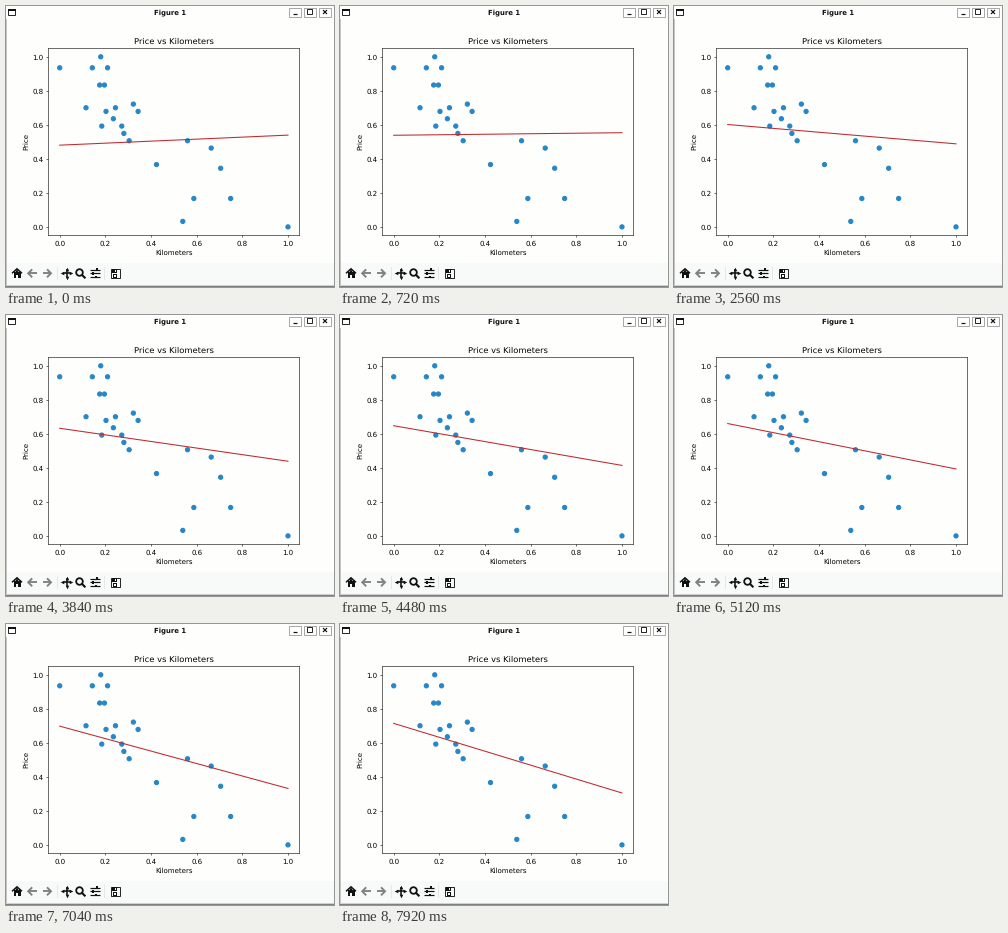
Animation, 328 px wide and 281 px high, one loop 8000 ms. Source, as a matplotlib script:

```python
import matplotlib.pyplot as plt
import numpy as np
from matplotlib.animation import FuncAnimation
from matplotlib.patches import Rectangle

W, H, DPI = 328, 281, 64      # a power of two keeps the pixel size exact
K = 50.6 / DPI                # window is shown at 50.6 dpi
PX = 72 / DPI                 # points per pixel
FRAMES, STEP_MS = 100, 80
HOLDS = {1, 26, 44, 95}       # frames that repeat the one before

INK, GRAY, BLUE, RED = "#111111", "#808080", "#2586c8", "#bf2a30"
PAPER, BAR = "#fefefd", "#f8faf9"

plt.rcParams.update({
    "font.family": "DejaVu Sans", "font.size": 10 * K, "text.hinting": "none",
    "axes.titlesize": 12 * K, "axes.titlepad": 6 * K, "axes.labelpad": 4 * K,
    "axes.linewidth": 0.8 * K,
})
for axis in ("xtick", "ytick"):
    for key, size in (("size", 3.5), ("pad", 3.5), ("width", 0.8)):
        plt.rcParams[f"{axis}.major.{key}"] = size * K

# Thousands of kilometers at each price; the middle prices are evenly spaced
cars = dict(zip(range(5800, 7001, 200),
                ([167], [89, 144.5], [84], [82, 63], [74], [97.5, 67], [93])))
cars |= {3650: [240], 3800: [140], 4425: [150.5, 185.5], 5250: [176],
         5350: [115], 6900: [76, 48], 7520: [61, 65.5],
         7990: [54, 68.5, 23], 8290: [62]}


def normalize(values):
    v = np.array(values)
    return (v - v.min()) / (v.max() - v.min())


def descend(x, y, steps, rate=0.1):
    """Intercept and slope after every gradient descent step."""
    a = b = 0.0
    path = [(a, b)]
    for _ in range(steps):
        err = a + b * x - y
        a, b = a - rate * err.mean(), b - rate * (err * x).mean()
        path.append((a, b))
    return path


x = normalize([km for kms in cars.values() for km in kms])
y = normalize([price for price, kms in cars.items() for _ in kms])
path = descend(x, y, 150)

fig = plt.figure(figsize=(W / DPI, H / DPI), dpi=DPI, facecolor=PAPER)

# Window frame and toolbar, in pixel coordinates
win = fig.add_axes([0, 0, 1, 1])
win.set(xlim=(0, W), ylim=(H, 0))
win.axis("off")


def box(x0, y0, w, h, fill="none", edge="none"):
    win.add_patch(Rectangle((x0, y0), w, h, fc=fill, ec=edge, lw=0.9 * PX))


def stroke(xs, ys, color=INK, lw=1.2):
    win.plot(xs, ys, color=color, lw=lw * PX, solid_capstyle="butt",
             solid_joinstyle="miter")


def mark(cx, cy, marker, size, fill=INK, lw=0.0):
    win.plot(cx, cy, marker=marker, ms=size * PX, mfc=fill, mec=INK,
             mew=lw * PX)


def title_bar():
    win.text(W / 2, 8, "Figure 1", size=6.9 * PX, weight="bold",
             ha="center", va="baseline", color=INK)
    box(2.4, 3.4, 7, 6, "white", INK)
    box(2, 3, 8, 2, INK)
    for cx in (289, 304, 319):
        box(cx - 6, 1.5, 12, 9, "white", "#a0a0a0")
    stroke([287, 291], [8, 8])
    box(301.4, 3.4, 5, 5, "none", INK)
    for slope in (1, -1):
        stroke([317, 321], [6 - 2 * slope, 6 + 2 * slope])


def home(cx, cy):
    stroke([cx - 5, cx, cx + 5], [cy, cy - 4.5, cy], lw=1.5)
    box(cx - 3.5, cy - 1, 7, 5.5, INK)
    mark(cx, cy - 1, "^", 6)
    box(cx - 1, cy + 1.5, 2, 3, BAR)


def arrow(cx, cy, side):
    stroke([cx - 4.5 * side, cx + 4 * side], [cy, cy], GRAY, 1.9)
    stroke([cx, cx + 4 * side, cx], [cy - 4, cy, cy + 4], GRAY, 1.9)


def pan(cx, cy):
    stroke([cx - 4, cx + 4], [cy, cy], lw=1.6)
    stroke([cx, cx], [cy - 4, cy + 4], lw=1.6)
    for marker, angle in zip(">v<^", np.arange(4) * np.pi / 2):
        mark(cx + 4.5 * np.cos(angle), cy + 4.5 * np.sin(angle), marker, 3.6)


def zoom(cx, cy):
    mark(cx - 1, cy - 1, "o", 6.6, BAR, 1.8)
    stroke([cx + 1.2, cx + 5], [cy + 1.2, cy + 5], lw=2.1)


def sliders(cx, cy):
    for row, knob in zip((-1, 0, 1), (2, -2, 1)):
        level = cy + 3.7 * row
        stroke([cx - 5, cx + 5], [level, level])
        box(cx + knob - 0.8, level - 1.4, 1.6, 2.8, INK)


def save(cx, cy):
    box(cx - 4.4, cy - 4.4, 9, 9, BAR, INK)
    box(cx - 2.8, cy - 4, 5, 3.2, INK)
    box(cx, cy - 3.4, 1.3, 1.6, BAR)
    box(cx - 2, cy + 0.8, 4, 3.4, INK)
    box(cx - 1, cy + 1.6, 2, 2, BAR)


def toolbar(cy=267.3):
    box(0, 257, W, H - 257, BAR)
    home(11, cy)
    arrow(26.2, cy, -1)
    arrow(41, cy, 1)
    pan(60.5, cy)
    zoom(74.4, cy)
    sliders(89, cy)
    save(109, cy)
    for left in (51, 98):
        box(left, 261, 1, 13, "#e6e8e8")


title_bar()
toolbar()
box(0, 13, 1, H - 13, "#c4c4c4")
box(0, H - 2, W, 1, "#d0d0d0")
box(0, H - 1, W, 1, "#808080")

# Chart
ax = fig.add_axes([42.3 / W, (H - 229.4) / H, 251.1 / W, 187.1 / H],
                  facecolor=PAPER)
# one size per dot keeps their subpixel positions
ax.scatter(x, y, s=np.full(x.shape, 36 * K ** 2), color=BLUE,
           linewidths=1.5 * K)
line, = ax.plot([], [], color=RED, lw=1.5 * K)
ticks = np.arange(0, 1.1, 0.2)
ax.set(xlim=(-0.05, 1.05), ylim=(-0.05, 1.05), xticks=ticks, yticks=ticks,
       title="Price vs Kilometers", xlabel="Kilometers", ylabel="Price")


def update(i):
    shown = i - 1 if i in HOLDS else i
    a, b = path[int(19.4 + 1.21 * shown)]
    line.set_data([0, 1], [a, a + b])
    return line,


anim = FuncAnimation(fig, update, frames=FRAMES, interval=STEP_MS,
                     init_func=lambda: update(0), repeat=True, repeat_delay=0)
plt.show()
```
